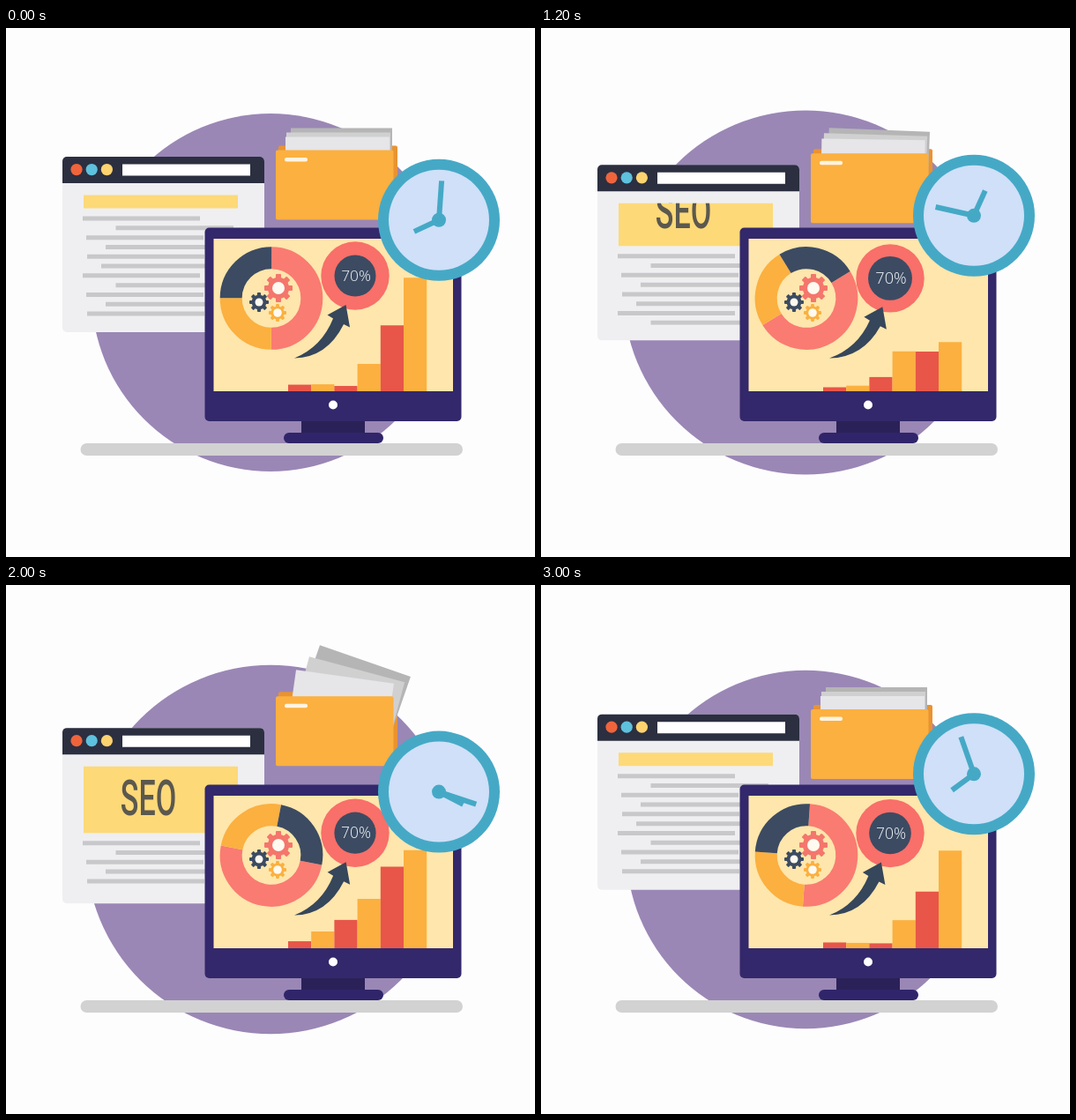
Write an HTML page with a canvas that moves like this. It is 600 by 600 pixels and loops after 3100 ms.

```html
<!DOCTYPE html>
<html lang="en">
<head>
<meta charset="utf-8">
<title>Analytics desk</title>
<style>
html, body { margin: 0; width: 100%; height: 100%; overflow: hidden; background: #fefdfe; }
canvas { display: block; }
</style>
</head>
<body>
<canvas id="stage" width="600" height="600"></canvas>
<script>
const ctx = document.getElementById('stage').getContext('2d');
const LOOP = 3100, STEP = 100, TAU = Math.PI * 2;
const NAVY = '#3c4b62', AMBER = '#fbb040', CORAL = '#fa7b72', CREAM = '#fee6ac', TEAL = '#45a9c6';

const rad = deg => deg * Math.PI / 180;
const mix = (a, b, k) => a + (b - a) * k;
const smooth = (a, b, v) => {
  const k = Math.min(1, Math.max(0, (v - a) / (b - a)));
  return k * k * (3 - 2 * k);
};
// Rises and falls between 0 and 1, "times" per loop
const pulse = (t, times) => (1 - Math.cos(TAU * times * (t + 20) / LOOP)) / 2;

function rect(color, x, y, w, h, r = 0) {
  ctx.fillStyle = color;
  ctx.beginPath();
  ctx.roundRect(x, y, w, h, r);
  ctx.fill();
}

function disc(color, x, y, r) {
  ctx.fillStyle = color;
  ctx.beginPath();
  ctx.arc(x, y, r, 0, TAU);
  ctx.fill();
}

function clipped(x, y, w, h, paint) {
  ctx.save();
  ctx.beginPath();
  ctx.rect(x, y, w, h);
  ctx.clip();
  paint();
  ctx.restore();
}

function label(text, x, y, font, color) {
  ctx.font = font;
  ctx.fillStyle = color;
  ctx.textAlign = 'center';
  ctx.fillText(text, x, y);
}

const LINES = [[87, 220], [124.5, 258], [91, 224], [113, 246], [92, 225], [108, 241]];

function drawBrowser(s) {
  const top = 146 + 24.3 * s;
  rect('#efeff1', 64, top, 229, 199, 5);
  rect('#2b2f40', 64, top, 229, 30, [5, 5, 0, 0]);
  ['#f0643c', '#5ec1dd', '#fdd36f'].forEach((c, i) => disc(c, 80 + 17.2 * i, top + 14.5, 6.6));
  rect('#ffffff', 132, top + 8.5, 145, 13);

  const panelY = top + 43.5;
  const grow = Math.max(0, 97 * (s - 0.04));
  rect('#fdd978', 88, panelY, 175, 15 + grow);
  clipped(88, panelY, 175, 15 + grow, () => {
    ctx.translate(161.5, panelY + grow - 5);
    ctx.scale(0.62, 1);
    label('SEO', 0, 0, '500 55px Roboto, sans-serif', '#5b584f');
  });
  clipped(64, top, 229, 181.5, () => {
    for (let i = 0; i < 11; i++) {
      const [a, b] = LINES[i % 6];
      rect('#c8c8ca', a, top + 67.5 + 10.8 * i + grow, b - a, 5);
    }
  });
}

function drawFolder(y, fan) {
  rect('#e99331', 306, y + 2, 138, 75, 2);
  rect('#e99331', 309, y - 5, 135, 30, 2);
  // colour, left, top, spread x, spread y, tilt
  [['#b5b5b6', 323, -25, 33, -33, 19.2],
   ['#d0d0d1', 318, -20, 26, -25, 15],
   ['#e6e5e8', 317, -15, 12, -15, 8]].forEach(([c, x, dy, sx, sy, tilt]) => {
    ctx.save();
    ctx.translate(x + sx * fan, y + dy + sy * fan);
    ctx.rotate(rad(tilt * fan));
    rect(c, 0, 0, mix(118, 112, fan) - (x > 320 ? 3 : 0), 70);
    ctx.restore();
  });
  rect(AMBER, 306, y, 133.5, 79, 2);
  rect('#fff3e0', 316, y + 8.5, 26, 4.5, 2);
}

function drawGear(color, x, y, r, hole) {
  ctx.save();
  ctx.translate(x, y);
  disc(color, 0, 0, r * 0.76);
  for (let i = 0; i < 8; i++) {
    rect(color, -r * 0.19, -r, r * 0.38, r * 0.5, 1);
    ctx.rotate(TAU / 8);
  }
  disc('#fffaf0', 0, 0, hole);
  ctx.restore();
}

function drawDonut(turn) {
  [[CORAL, 0, 180], [AMBER, 180, 270], [NAVY, 270, 360]].forEach(([c, a, b]) => {
    ctx.strokeStyle = c;
    ctx.lineWidth = 25;
    ctx.beginPath();
    ctx.arc(301, 306.5, 45.8, rad(a + turn - 90), rad(b + turn - 90));
    ctx.stroke();
  });
  drawGear('#f4766c', 309, 295, 16, 7);
  drawGear(NAVY, 287, 311, 11, 4.5);
  drawGear(AMBER, 308, 323, 10, 4.8);
}

function drawArrow(k) {
  const x = 6.5 * k, y = 7.5 * k;
  ctx.fillStyle = '#36465b';
  ctx.beginPath();
  ctx.moveTo(327, 374.5);
  ctx.quadraticCurveTo(358 + x / 2, 362 + y / 2, 371 + x, 329.5 + y);
  ctx.lineTo(364.5 + x, 325.5 + y);
  ctx.lineTo(385.5 + x, 314 + y);
  ctx.lineTo(390 + x, 339.5 + y);
  ctx.lineTo(383 + x, 336 + y);
  ctx.quadraticCurveTo(364 + x / 2, 374, 327, 374.5);
  ctx.fill();
}

// mean height, swing, phase in degrees
const BARS = [[6.3, 2.3, 60], [12.5, 7.2, 130], [23.3, 17.9, 165],
              [49.7, 18.8, 175], [69.3, 26, 78], [86, 56.7, 41]];

function drawMonitor(t, s) {
  rect('#2a2158', 335, 444, 72, 18);
  rect('#30256a', 315, 459, 113, 12, 6);
  rect('#33286b', 225.5, 226.5, 291, 219.5, 5);
  rect(CREAM, 235.5, 239, 271.5, 173);
  disc('#ffffff', 371, 427.5, 5);

  drawDonut(152 * s);
  BARS.forEach(([mean, swing, phase], i) => {
    const h = mean + swing * Math.cos(2 * TAU * t / LOOP - rad(phase));
    rect(i % 2 ? AMBER : '#e75649', 320 + 26.2 * i, 412 - h, 26.2, h);
  });

  const k = pulse(t, 3);
  const y = 281 + 10 * k;
  disc('#f96f69', 396, y, 38.7);
  disc(NAVY, 396 , y, 23.5 + 5 * k);
  const size = 17.3 + 3 * k;
  label('70%', 397, y + size * 0.36, `300 ${size}px "Open Sans", sans-serif`, '#eef2f6');
  drawArrow(k);
}

function drawClock(t, y) {
  disc(TEAL, 491, y, 69);
  disc('#cfe0f8', 491, y, 57);
  const hand = (deg, length) => {
    ctx.save();
    ctx.translate(491, y);
    ctx.rotate(rad(deg));
    rect(TEAL, -3, -length, 6, length);
    ctx.restore();
  };
  hand(4 + 720 * t / LOOP, 44.5);
  hand(245 + 360 * t / LOOP, 31);
  disc(TEAL, 491, y, 8);
}

function draw(t) {
  const s = pulse(t, 2);
  const half = t % (LOOP / 2);
  const sway = Math.sin(2 * TAU * t / LOOP - rad(30));
  const fan = smooth(50, 450, half) - smooth(900, 1280, half);

  rect('#fefdfe', 0, 0, 600, 600);
  disc('#9a87b5', 300, 300, 203 + 9.3 * s);
  rect('#d2d2d2', 84.5, 471, 433.5, 14, 7);
  drawBrowser(s);
  drawFolder(134.3 - 8.4 * sway, fan);
  drawMonitor(t, s);
  drawClock(t, 223.5 + 11.5 * sway);
}

function tick() {
  draw(Math.floor(performance.now() % LOOP / STEP) * STEP);
  requestAnimationFrame(tick);
}
tick();
</script>
</body>
</html>
```
